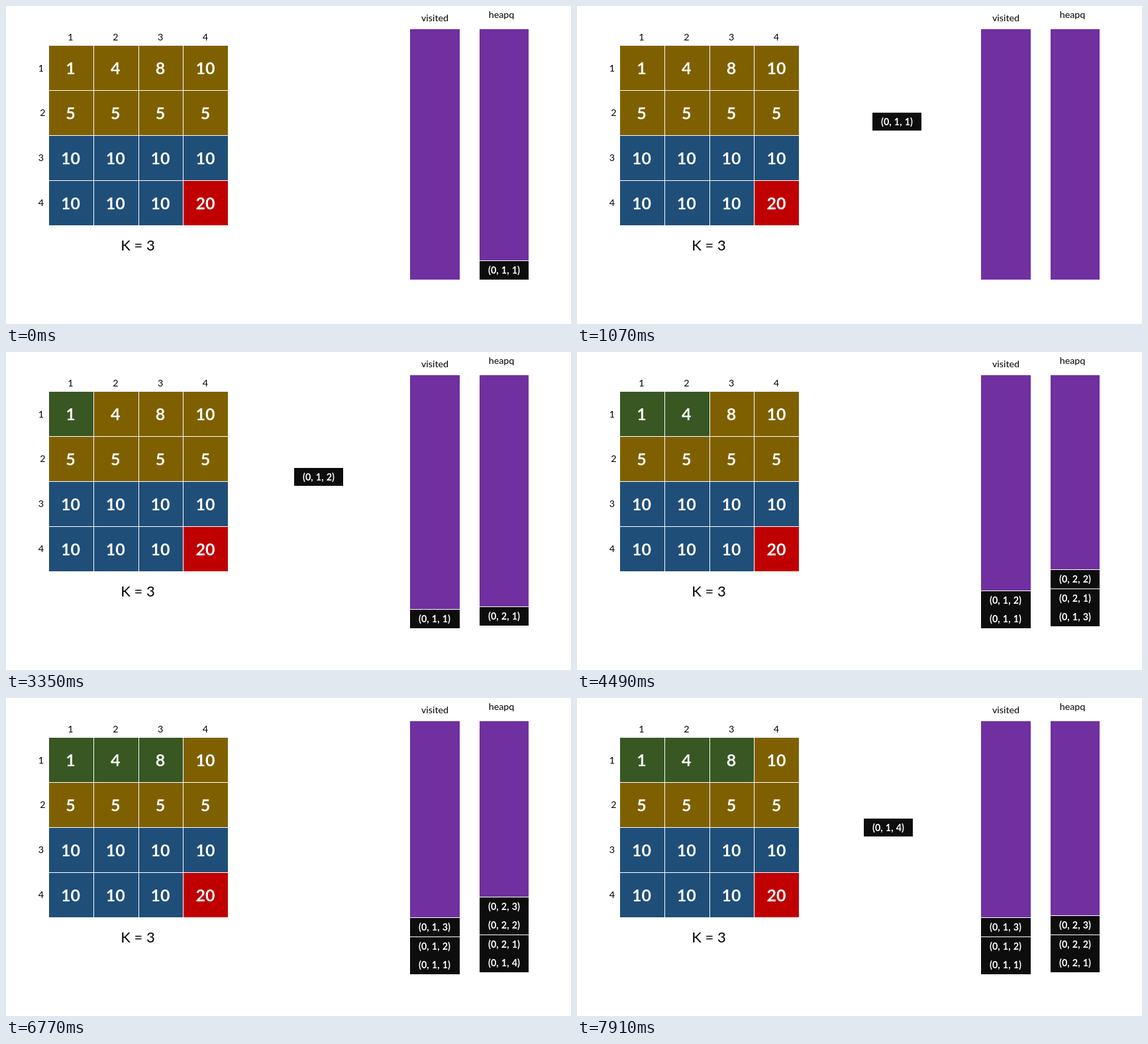
These frames come from a looping animation (853x480 px, 8000 ms). An HTML page:

```html
<!DOCTYPE html>
<html lang="en">
<head>
<meta charset="utf-8">
<title>Grid search with a heap</title>
<style>
  html, body { margin: 0; width: 100%; height: 100%; overflow: hidden; background: #fff; }
  svg { display: block; }
  text { font: 14.3px Lato, sans-serif; text-anchor: middle; }
  .cell { font-size: 25px; font-weight: 700; fill: #fff; }
  .entry { font-weight: 700; fill: #fff; word-spacing: .8px; }
  .limit { font-size: 22px; }
</style>
</head>
<body>
<svg id="stage" width="853" height="480" viewBox="0 0 853 480"></svg>
<script>
const OLIVE = '#7f6000', BLUE = '#1f4e79', RED = '#c00000', GREEN = '#385723';
const PURPLE = '#7030a0', BLACK = '#0d0d0d';
const GRID = [[1, 4, 8, 10], [5, 5, 5, 5], [10, 10, 10, 10], [10, 10, 10, 20]];
const POPPED_AT = [[446, 161], [435, 175], [428, 168], [433, 182]];
const LOOP = 8000, STEP = 1140, LEAD = 70;
const stage = document.getElementById('stage');

const rect = (x, y, w, h, fill) =>
  `<rect x="${x}" y="${y}" width="${w}" height="${h}" fill="${fill}"/>`;
const text = (x, y, value, kind = '') =>
  `<text x="${x}" y="${y}" class="${kind}">${value}</text>`;
const entry = ([row, col], x, y, h = 27) =>
  rect(x, y, 74, h, BLACK) + text(x + 37, y + 18.6, `(0, ${row}, ${col})`, 'entry');
const cells = (row, count) => Array.from({ length: count }, (_, i) => [row, i + 1]);

function cellColor(row, col, done) {
  if (row === 0 && col < done) return GREEN;
  if (row < 2) return OLIVE;
  return row === 3 && col === 3 ? RED : BLUE;
}

function drawGrid(done) {
  const xs = [65, 133, 201, 268, 336];
  let out = '';
  GRID.forEach((values, row) => {
    const mid = 94 + 68 * row;
    out += text(97.5 + 67.8 * row, 52, row + 1);
    out += text(row === 1 ? 55.5 : 53, mid + 5 - (row > 0), row + 1);
    values.forEach((value, col) => {
      const x = xs[col], w = xs[col + 1] - x - 1;
      out += rect(x, 60 + 68 * row, w, 67, cellColor(row, col, done));
      out += text(97.5 + 67.8 * col, mid + 9, value, 'cell');
    });
  });
  return out + text(199, 369, 'K = 3', 'limit');
}

// Entries stack upwards, each with a white line above it.
function drawStack(x, width, base, entries) {
  let out = rect(x, 35, width, 378, PURPLE);
  entries.forEach((item, i) => {
    const y = Math.round(base - 28.3 * i);
    out += rect(x, y, width, 1, '#fff') + rect(x, y + 1, width, 28, BLACK);
    out += entry(item, x, y + 1, 28);
  });
  return out;
}

function draw(step) {
  const done = step >> 1, popping = step % 2 === 1;
  const next = [1, done + 1];
  const heap = cells(2, done);
  if (!popping) heap.unshift(next);
  stage.innerHTML = drawGrid(done) +
    text(647.5, 23, 'visited') + text(748, 18, 'heapq') +
    drawStack(610, 75, 388, cells(1, done)) +
    drawStack(715, 74, done < 2 ? 384 : 385, heap) +
    (popping ? entry(next, ...POPPED_AT[done]) : '');
}

let shown = -1;
function tick() {
  const step = Math.floor((performance.now() % LOOP + LEAD) / STEP);
  if (step !== shown) draw(shown = step);
  requestAnimationFrame(tick);
}
tick();
</script>
</body>
</html>
```
